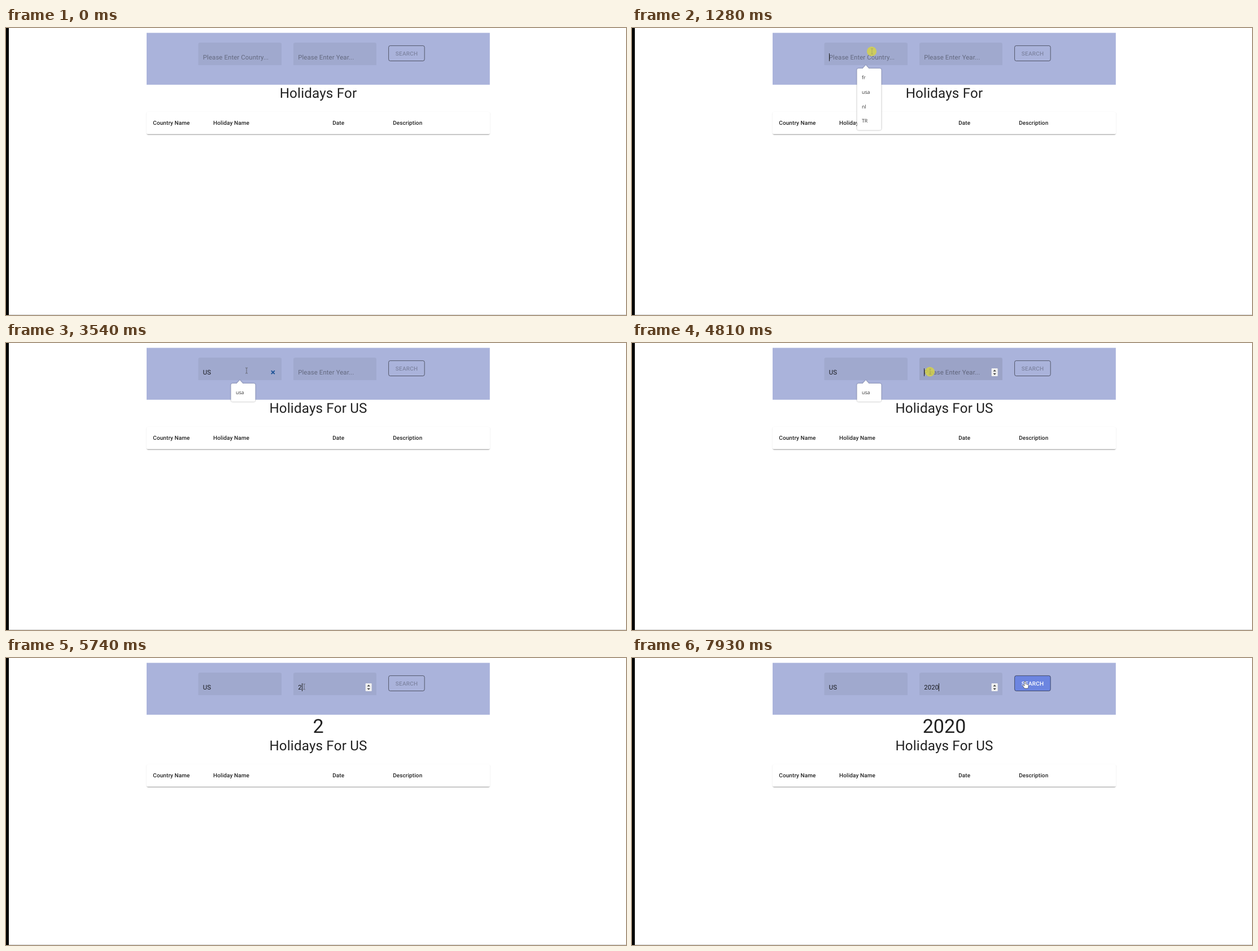
An HTML page that plays this animation: 1098x510 px, repeating every 8000 ms.

```html
<!DOCTYPE html>
<html lang="en">
<head>
<meta charset="utf-8">
<title>Holiday search</title>
<style>
  html, body { margin: 0; width: 100%; height: 100%; overflow: hidden; background: #fff; }
  #table {
    position: absolute; left: 249px; top: 148.5px; width: 608px; height: 40.2px;
    border-radius: 2.8px; background: #fff;
    box-shadow: 0 1.4px .7px -.7px rgba(0,0,0,.2), 0 .7px .7px rgba(0,0,0,.14), 0 .7px 2.1px rgba(0,0,0,.12);
  }
  #table::after {
    content: ""; position: absolute; left: 0; right: 0; bottom: 0;
    height: .7px; background: #e0e0e0;
  }
  svg { position: absolute; left: 0; top: 0; width: 1098px; height: 510px; }
  text {
    font-family: Roboto, sans-serif; fill: rgba(0,0,0,.87);
    white-space: pre; text-rendering: geometricPrecision;
  }
  .input { font-size: 11.38px; letter-spacing: .00938em; }
  .hint { fill: rgba(0,0,0,.38); }
  .title { font-size: 24.2px; letter-spacing: .00735em; text-anchor: middle; }
  .year { font-size: 34.1px; text-anchor: middle; }
  .head { font-size: 9.96px; font-weight: 500; letter-spacing: .01071em; }
  .button { font-size: 9.96px; font-weight: 500; letter-spacing: .02857em; text-anchor: middle; }
  .item { font-family: "Open Sans", "Noto Sans", sans-serif; font-size: 8.8px; fill: #333; }
  #popup { filter: drop-shadow(0 .7px 1.3px rgba(0,0,0,.4)); }
</style>
</head>
<body>
<div id="table"></div>
<svg viewBox="0 0 1098 510">
  <rect width="5" height="510" fill="#000"/>
  <rect x="5" y="509" width="1093" height="1" fill="#d2d2d2"/>
  <rect x="249" y="8.6" width="607.8" height="92.2" fill="#aab3db"/>

  <path d="M340.5 66V29q0-3 3-3H485q3 0 3 3V66z" fill-opacity=".06"/>
  <path id="field2" d="M509 66V29q0-3 3-3H653q3 0 3 3V66z"/>
  <text id="country" class="input" x="348.8" y="56"></text>
  <text id="number" class="input" x="517.2" y="56"></text>
  <path id="clear" d="M469.8 49.2l6 6m0-6l-6 6" stroke="#1d5397" stroke-width="1.9"/>
  <g id="spinner">
    <rect x="636.7" y="45" width="11" height="14" rx="1" fill="#f0f0f0"/>
    <path d="M639.4 50.4l2.8-3 2.8 3zM639.4 53.8l2.8 3 2.8-3z" fill="#444"/>
  </g>
  <rect id="caret" y="45" width="1" height="14" fill="#222"/>

  <rect id="button" x="677.6" y="31.4" width="63.6" height="27.1" rx="3" stroke="rgba(0,0,0,.75)" stroke-width=".7"/>
  <text id="label" class="button" x="709.6" y="48.5">SEARCH</text>

  <text id="year" class="year" x="553" y="133.2"></text>
  <text id="title" class="title" x="553"></text>
  <g id="heads">
    <text class="head" x="260.3" y="171.7">Country Name</text>
    <text class="head" x="367.1" y="171.7">Holiday Name</text>
    <text class="head" x="578.2" y="171.7">Date</text>
    <text class="head" x="685.2" y="171.7">Description</text>
  </g>

  <g id="popup">
    <path id="bubble" fill="#fff"/>
    <g id="items"></g>
  </g>

  <circle id="click" r="8.6" fill="rgba(216,213,66,.8)"/>
  <g id="cursor">
    <path id="beam" d="M-2-5Q0-5 0-4Q0-5 2-5M0-4V4M-2 5Q0 5 0 4Q0 5 2 5" fill="none" stroke="#5d5f68" stroke-width=".9"/>
    <path id="arrow" d="M0 0V11.4L2.6 9 4.4 13 6.2 12.2 4.4 8.3H8z" fill="#fff" stroke="#000" stroke-width=".7"/>
    <path id="hand" d="M-1 7.6V0Q0-1.6 1 0V4.2Q2.2 3.6 2.8 4.7Q4 4.2 4.5 5.3Q6 5 6 6.6V9Q6 11 4.8 12H-.8L-4.3 7.3Q-4.6 5.8-3 6z" fill="#fff" stroke="#222" stroke-width=".6"/>
  </g>
</svg>
<script>
const LOOP = 8000, TICK = 1000 / 15, BLINK = 530;
const $ = Object.fromEntries([...document.querySelectorAll("[id]")].map(e => [e.id, e]));

// Moments of focus in each field and of every key press
const FOCUS = { country: 1210, number: 4810 };
const KEYS = { country: [2880, 3010], number: [5740, 6280, 6610, 6870] };
const INPUTS = [...Object.values(FOCUS), ...Object.values(KEYS).flat()].sort((a, b) => a - b);

// Pointer moves, each starting where the previous one ended
const ENTER = { x: 1036, y: 495 };
const MOVES = [
  { from: 200, to: 940, x: 425, y: 41.5 },
  { from: 1400, to: 1670, x: 426, y: 49 },
  { from: 3740, to: 3870, x: 174, y: 80 },
  { from: 4000, to: 4470, x: 706, y: 84 },
  { from: 4470, to: 4800, x: 528, y: 51 },
  { from: 7600, to: 7930, x: 696, y: 42 },
];

const ramp = (t, from, span) => Math.max(0, Math.min(1, (t - from) / span));
const mix = (a, b, k) => a + (b - a) * k;
const mixAll = (a, b, k) => a.map((v, i) => mix(v, b[i], k));
const easeOut = k => 1 - (1 - k) ** 2;
const show = (el, on) => { el.style.display = on ? "" : "none"; };
const typed = (word, keys, t) => word.slice(0, keys.filter(k => t >= k).length);

function pointer(t) {
  return MOVES.reduce((p, m) => {
    const k = easeOut(ramp(t, m.from, m.to - m.from));
    return { x: mix(p.x, m.x, k), y: mix(p.y, m.y, k) };
  }, ENTER);
}

function fillInput(el, value, hint) {
  el.textContent = value || hint;
  el.classList.toggle("hint", !value);
}

function drawCaret(t, el, value) {
  const last = INPUTS.filter(i => t >= i).pop();
  const width = value ? el.getComputedTextLength() : 0;
  $.caret.setAttribute("x", Math.round(el.x.baseVal[0].value + width));
  show($.caret, last && (t - last) % (2 * BLINK) < BLINK);
}

function drawPopup(t, tick, filtered) {
  const names = filtered ? ["usa"] : ["fr", "usa", "nl", "TR"];
  const step = 25.7, bottom = 78.6 + names.length * step;
  $.bubble.setAttribute("d", `M401.5 72H408.5L414 66 419.5 72H438.5q3 0 3 3V${bottom - 3}q0 3-3 3H401.5q-3 0-3-3V75q0-3 3-3z`);
  $.items.innerHTML = names.map((n, i) =>
    `<text class="item" x="407" y="${91.3 + i * step}">${n}</text>`).join("");
  $.popup.style.opacity = ramp(t, FOCUS.country - 60, 120) - ramp(tick, FOCUS.number - 10, 200);
}

function drawPointer(t, tick) {
  const { x, y } = pointer(tick);
  const inField = y > 26 && y < 66 && (x > 341 && x < 488 || x > 509 && x < 656);
  const onButton = x > 678 && y < 58;
  const clicked = Object.values(FOCUS).some(f => t >= f && t < f + 200);
  show($.cursor, t >= MOVES[0].from);
  show($.beam, inField);
  show($.hand, onButton && t > MOVES[5].from);
  show($.arrow, !inField && !onButton);
  show($.click, clicked);
  $.beam.style.opacity = clicked ? .35 : 1;
  $.cursor.setAttribute("transform", `translate(${x} ${y})`);
  $.click.setAttribute("cx", x - .5);
  $.click.setAttribute("cy", y);
}

function draw(t) {
  const tick = Math.floor(t / TICK) * TICK;
  const country = typed("US", KEYS.country, t), year = typed("2020", KEYS.number, t);
  const second = t >= FOCUS.number;
  fillInput($.country, country, "Please Enter Country...");
  fillInput($.number, year, "Please Enter Year...");
  $.title.textContent = `Holidays For ${country}`.trim();
  $.year.textContent = year;

  const shift = year ? 40 : 0;
  $.title.setAttribute("y", 123.8 + shift);
  $.heads.setAttribute("transform", `translate(0 ${shift})`);
  $.table.style.transform = `translateY(${shift}px)`;

  const hovered = t >= FOCUS.number - 150;
  show($.clear, country && !second);
  show($.spinner, hovered);
  $.field2.style.fillOpacity = hovered && !year ? .09 : .06;

  const enabled = ramp(tick, KEYS.number[0], 250), hover = ramp(tick, 7720, 200);
  const ink = mixAll([0, 0, 0, .26], [238, 240, 250, 1], enabled);
  $.label.style.fill = `rgba(${mixAll(ink, [255, 255, 255, 1], hover)})`;
  $.button.style.fill = `rgb(${mixAll([170, 179, 219], [108, 133, 224], hover)})`;

  if (second) drawCaret(t, $.number, year);
  else drawCaret(t, $.country, country);
  drawPopup(t, tick, country);
  drawPointer(t, tick);
}

const start = performance.now();
function frame() {
  draw((performance.now() - start + 7) % LOOP);
  requestAnimationFrame(frame);
}
frame();
</script>
</body>
</html>
```
